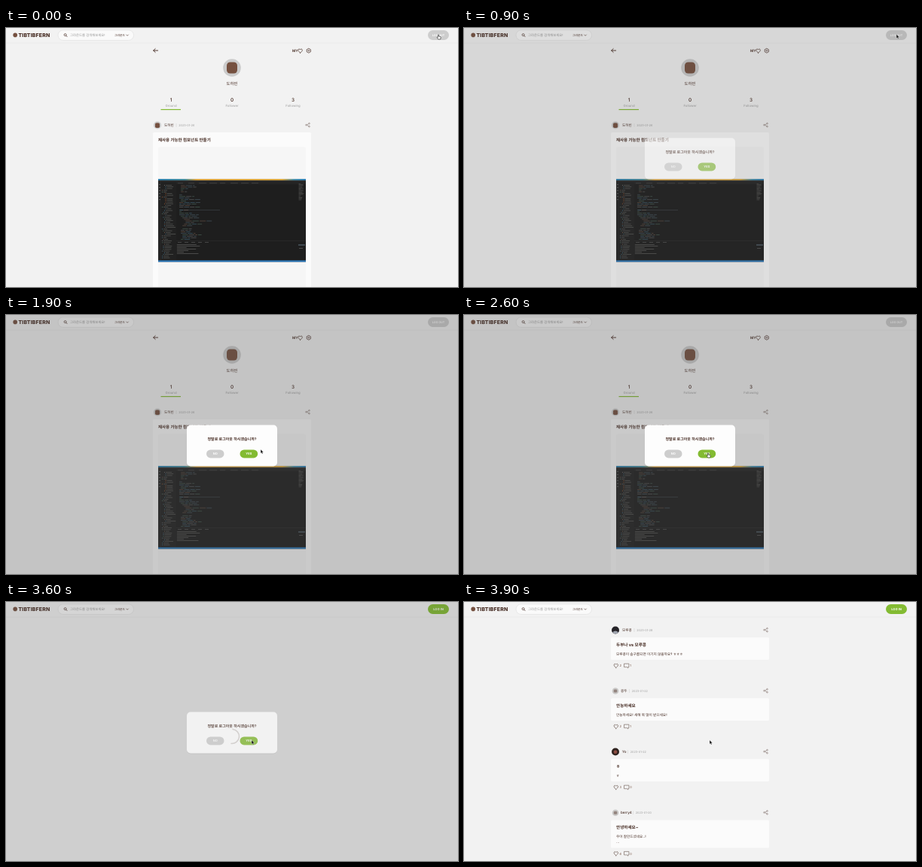
An HTML page that plays this animation: 600 px wide and 345 px high, repeating every 4400 ms.

```html
<!DOCTYPE html>
<html lang="ko">
<head>
<meta charset="utf-8">
<title>Log out</title>
<style>
  html, body { margin: 0; width: 100%; height: 100%; overflow: hidden; background: #f2f2f2; }
  svg { display: block; width: 600px; height: 345px; }
  text { font-family: Inter, "Noto Sans CJK KR", "Noto Sans CJK", "Noto Sans CJK JP", sans-serif; text-rendering: geometricPrecision; }
</style>
</head>
<body>
<svg id="stage" viewBox="0 0 600 345"></svg>
<script>
const LOOP = 4400;
const BG = '#f2f2f2', BROWN = '#43281f', SOFT = '#75503f', GRAY = '#9c9c9c', GREEN = '#83bb32';
const stage = document.getElementById('stage');

function add(parent, tag, attrs = {}) {
  const el = document.createElementNS('http://www.w3.org/2000/svg', tag);
  for (const key in attrs) el.setAttribute(key, attrs[key]);
  return parent.appendChild(el);
}
const group = parent => add(parent, 'g');
const rect = (g, x, y, width, height, fill, rx = 0, more = {}) =>
  add(g, 'rect', { x, y, width, height, fill, rx, ...more });
const circle = (g, cx, cy, r, fill, more = {}) => add(g, 'circle', { cx, cy, r, fill, ...more });
const line = (g, d, stroke, width = 0.7, more = {}) =>
  add(g, 'path', { d, stroke, 'stroke-width': width, fill: 'none', 'stroke-linecap': 'round', 'stroke-linejoin': 'round', ...more });

// y is the vertical middle of the capitals
function label(g, x, y, text, size, fill = BROWN, weight = 400, anchor = 'start', more = {}) {
  const el = add(g, 'text', { x, y: y + size * 0.36, 'font-size': size, fill, 'font-weight': weight, 'text-anchor': anchor, ...more });
  el.textContent = text;
  return el;
}

function pill(g, x, y, w, h, fill, text, size) {
  rect(g, x, y, w, h, fill, h / 2);
  label(g, x + w / 2, y + h / 2, text, size, '#fff', 700, 'middle');
}

function heart(g, x, y, color) {
  line(g, `M${x} ${y + 2.7}c-1.1-.9-2.7-2.1-2.7-3.6 0-1.7 2-2.1 2.7-.6 .7-1.5 2.7-1.1 2.7 .6 0 1.5-1.6 2.7-2.7 3.6z`, color);
}

function share(g, x, y) {
  line(g, `M${x + 1.5} ${y - 1.7}L${x - 1.5} ${y}L${x + 1.5} ${y + 1.7}`, '#80706a', 0.6);
  for (const [dx, dy] of [[2, -2], [-2, 0], [2, 2]])
    circle(g, x + dx, y + dy, 0.85, BG, { stroke: '#80706a', 'stroke-width': 0.6 });
}

function author(g, y, { name, nameX, dividerX, date, avatar }) {
  avatar(g, 201, y);
  label(g, nameX, y, name, 4.6, BROWN, 500);
  line(g, `M${dividerX} ${y - 2}v4`, '#cfcfcf', 0.5);
  label(g, dividerX + 3.3, y, date, 3.75, GRAY);
  share(g, 400.5, y - 0.3);
}

const plainAvatar = (g, x, y) => {
  circle(g, x, y, 5, '#cbcbcb');
  rect(g, x - 3, y - 3, 6, 6.5, SOFT, 1.8);
};
const smallAvatar = (g, x, y) => {
  circle(g, x, y, 4.3, '#c9c8c7');
  rect(g, x - 2.2, y - 2, 4.4, 4, '#93847e', 1.3);
};
const darkAvatar = (g, x, y) => {
  circle(g, x, y, 5, '#252328');
  add(g, 'path', { d: `M${x - 4} ${y + 3}q4-4 8 0q-4 4-8 0z`, fill: '#9fa4ae' });
};
const warmAvatar = (g, x, y) => {
  circle(g, x, y, 5, '#30231f');
  rect(g, x - 2.3, y - 2, 4.6, 4.6, '#8c4c42', 2);
};

function drawEditor(g) {
  let seed = 17;
  const random = () => (seed = (seed * 16807) % 2147483647) / 2147483647;
  const pick = list => list[Math.floor(random() * list.length)];
  const dash = (x, y, w, color, opacity = 0.45) => rect(g, x, y, w, 0.75, color, 0, { opacity });
  const colors = ['#5f9fc0', '#7295a8', '#a8846c', '#70a08a', '#99999b'];

  rect(g, 202, 201, 196, 110.5, '#1e1e1e');
  rect(g, 202, 201, 196, 2, 'url(#menubar)');
  rect(g, 202, 203, 196, 2.4, '#2b2b2b');
  rect(g, 202, 205.4, 4, 104, '#242424');
  rect(g, 206, 205.4, 20, 104, '#212121');
  rect(g, 226, 205.4, 172, 2.8, '#242424');
  rect(g, 202, 309.6, 196, 1.8, '#2f86d0');
  for (let i = 0; i < 6; i++) circle(g, 204, 208.5 + i * 4, 0.7, '#77797a');
  for (let x = 228; x < 335; x += 14) dash(x, 206.4, 7 + random() * 4, '#929292', 0.3);

  for (let y = 209; y < 307; y += 2.25) {
    const x = 207 + Math.floor(random() * 4) * 1.5;
    dash(x, y, 1, y > 220 && y < 234 ? '#e0793c' : pick(colors), 0.8);
    dash(x + 2, y, 4 + random() * 8, '#a0a39d', 0.42);
  }
  let indent = 1;
  for (let y = 209.5; y < 283; y += 2.05) {
    indent = Math.max(0, Math.min(4, indent + Math.floor(random() * 3) - 1));
    if (random() < 0.12) continue;
    let x = 230 + indent * 2.1;
    const words = 1 + Math.floor(random() * 4);
    for (let i = 0; i < words; i++) {
      const w = 2.5 + random() * 6;
      dash(x, y, w, pick(colors));
      x += w + 1;
    }
  }
  dash(231, 242, 53, '#8ba4af', 0.25);
  rect(g, 226, 283.5, 172, 0.4, '#353535');
  for (let x = 228; x < 268; x += 9) dash(x, 285, 5, '#bbb', 0.35);
  for (let y = 288; y < 301; y += 2) dash(226.8, y, 8 + random() * 24, '#b3b4b1', 0.4);
  for (let y = 207; y < 229; y += 1.2) dash(388.5, y, 2 + random() * 5, '#9b9b98', 0.3);
  rect(g, 388, 288, 9, 2, '#3f4950');
  dash(389, 293, 5, '#999', 0.5);
}

function drawProfile(g) {
  line(g, 'M201.6 30H195.7M198.2 27.6L195.7 30L198.2 32.4', BROWN, 0.9);
  label(g, 380, 30.4, 'MY', 4.7, BROWN, 600);
  heart(g, 390.6, 30.4, BROWN);
  add(g, 'path', { d: 'M401.8 27.2l2.6 1.5v3l-2.6 1.5-2.6-1.5v-3z', fill: 'none', stroke: BROWN, 'stroke-width': 0.7, 'stroke-linejoin': 'round' });
  circle(g, 401.8, 30.2, 1, 'none', { stroke: BROWN, 'stroke-width': 0.6 });

  circle(g, 300, 53, 11.8, '#cbcbcb');
  rect(g, 293, 45.5, 14, 15, SOFT, 4.5);
  label(g, 300, 74, '도하빈', 5.4, BROWN, 500, 'middle');
  [['1', 'Ground'], ['0', 'Follower'], ['3', 'Following']].forEach(([count, name], i) => {
    const x = 219 + i * 81;
    label(g, x, 96, count, 6.4, BROWN, 500, 'middle');
    label(g, x, 103, name, 4.3, GRAY, 400, 'middle');
  });
  rect(g, 205.5, 108, 26.5, 1.2, GREEN);

  author(g, 129.5, { name: '도하빈', nameX: 210, dividerX: 226, date: '2023-01-26', avatar: plainAvatar });
  rect(g, 195, 139, 210, 210, '#fbfbfb', 1.5);
  label(g, 202, 149.3, '재사용 가능한 컴포넌트 만들기', 5.5, BROWN, 700);
  rect(g, 202, 158.5, 196, 190, '#f6f6f6', 2);
  drawEditor(g);
}

const posts = [
  { y: 37.5, name: '모루콩', nameX: 210, dividerX: 226, date: '2023-01-28', avatar: darkAvatar,
    title: '두부나 vs 모루콩', body: ['모루콩이 솜구름되면 이기지 않을까요? ㅎㅎㅎ'], likes: 2, replies: 1 },
  { y: 118.5, name: '콩두', nameX: 208, dividerX: 219.5, date: '2023-01-22', avatar: smallAvatar,
    title: '안농하세요', body: ['안농하세요! 새해 복 많이 받으세요!'], likes: 2, replies: 1 },
  { y: 199.5, name: 'Yo', nameX: 210, dividerX: 217.5, date: '2023-01-22', avatar: warmAvatar,
    title: 'ㅎ', body: ['ㅎ'], likes: 3, replies: 0 },
  { y: 280.7, name: 'berry4', nameX: 208, dividerX: 224.5, date: '2023-01-20', avatar: smallAvatar,
    title: '안녕하세요~', body: ['우아 잘만드셨네요..!', '...'], likes: 6, replies: 0 },
];

function drawPost(g, post) {
  const { y } = post;
  const height = 22.5 + post.body.length * 7.2;
  author(g, y, post);
  rect(g, 195, y + 9.8, 210, height, '#fbfbfb', 1.5);
  label(g, 202, y + 19, post.title, 5.6, BROWN, 700);
  post.body.forEach((text, i) => label(g, 202, y + 31.5 + i * 7.5, text, 4.65, BROWN, 500));
  const foot = y + 47.5 + (post.body.length - 1) * 7;
  heart(g, 201.8, foot - 0.2, '#69564e');
  label(g, 206.6, foot, post.likes, 4, SOFT);
  const bubble = `M212.9 ${foot - 2.8}h6v4.5h-1.2v1.3l-1.5-1.3h-3.3z`;
  line(g, bubble, '#69564e', 0.6);
  label(g, 220.3, foot, post.replies, 4, SOFT);
}

function drawHeader(g) {
  rect(g, 0, 0, 600, 20, BG);
  rect(g, 0, 19.7, 600, 0.6, '#e4e4e4');
  circle(g, 12.2, 9.4, 2.8, SOFT);
  label(g, 16.4, 9.5, 'TIBTIBFERN', 6.9, BROWN, 800, 'start', { 'letter-spacing': 0.2 });
  rect(g, 69, 2.8, 100.5, 13.6, '#fafafa', 6.8, { stroke: '#dedede', 'stroke-width': 0.6 });
  circle(g, 78.6, 9.1, 1.5, 'none', { stroke: BROWN, 'stroke-width': 0.7 });
  line(g, 'M79.8 10.3L81 11.5', BROWN, 0.8);
  label(g, 85, 9.5, '그라운드를 검색해보세요!', 4.35, '#969696');
  label(g, 144, 9.5, '그라운드', 3.85, BROWN, 500);
  line(g, 'M159.8 9l1.3 1.3 1.3-1.3', BROWN, 0.6);
}

function drawModal(g) {
  rect(g, 240, 147.4, 120, 55, '#000', 5, { opacity: 0.06 });
  rect(g, 240, 146.5, 120, 55, '#fdfdfd', 5);
  label(g, 300, 164.9, '정말로 로그아웃 하시겠습니까?', 5, BROWN, 600, 'middle');
  pill(g, 266, 179.4, 23.5, 11, '#cdcdcd', 'NO', 4);
  pill(g, 310.5, 179.4, 23.7, 11, GREEN, 'YES', 4);
}

const gradient = add(add(stage, 'defs'), 'linearGradient', { id: 'menubar' });
[[0, '#2f80ad'], [0.18, '#468c9c'], [0.26, '#d9a23f'], [0.84, '#d8a640'], [0.92, '#4b8fa8'], [1, '#2f7fb5']]
  .forEach(([offset, color]) => add(gradient, 'stop', { offset, 'stop-color': color }));

rect(stage, 0, 0, 600, 345, BG);
const profile = group(stage), feed = group(stage);
drawProfile(profile);
posts.forEach(post => drawPost(feed, post));
drawHeader(group(stage));
const logOut = group(stage), logIn = group(stage);
pill(logOut, 560, 3, 28, 13, '#cdcdcd', 'LOG OUT', 3.7);
pill(logIn, 560, 3, 28, 13, GREEN, 'LOG IN', 4.1);
const spinner = line(stage, 'M300 169.5A9.5 9.5 0 0 1 300 188.5', '#4b3a32', 1.5);
const shade = rect(stage, 0, 0, 600, 345, '#4b4b4b');
const modal = group(stage);
drawModal(modal);

const arrow = group(stage), hand = group(stage);
add(arrow, 'path', { d: 'M0 0v5.2l1.2-1 .9 1.9 1-.5-.9-1.8h1.6z', fill: '#111', stroke: '#fff', 'stroke-width': 0.35 });
add(hand, 'path', { d: 'M-.6.2q.6-.7 1.2 0v2l2.2.5q.5.2.4 1l-.5 2.3h-2.9l-1.7-2.2q0-.8.7-.7l.6.4z', fill: '#fff', stroke: '#222', 'stroke-width': 0.6 });

// [time, value]: each value holds until the next time
const fade = [[0, 0], [600, 0.03], [700, 0.1], [800, 0.28], [900, 0.57], [1000, 0.96], [1100, 1],
  [3500, 0.95], [3600, 0.76], [3700, 0.36], [3800, 0.08], [3900, 0]];
const pointer = [[0, [574, 9, hand]], [700, [574, 8.5, arrow]], [1200, [562, 20, arrow]], [1300, [500, 98, arrow]],
  [1400, [416, 205, arrow]], [1500, [362, 244, arrow]], [1600, [345, 212, arrow]], [1700, [343, 182, arrow]],
  [1900, [338, 179, arrow]], [2000, [333, 181, hand]], [2100, [327, 183, hand]], [2200, [323, 184, hand]],
  [2600, [324, 184, hand]], [2700, [326, 184, hand]], [2800, [326.5, 184, hand]], [3500, [326, 184, arrow]]];
const page = [[0, 'profile'], [3500, 'loading'], [3900, 'feed']];
const at = (steps, time) => steps.findLast(([start]) => start <= time)[1];
const show = (el, on) => el.setAttribute('visibility', on ? 'visible' : 'hidden');

function render(now) {
  const time = now % LOOP;
  const current = at(page, time), opacity = at(fade, time), [x, y, shape] = at(pointer, time);
  show(profile, current === 'profile');
  show(logOut, current === 'profile');
  show(logIn, current !== 'profile');
  show(spinner, current === 'loading');
  show(feed, current === 'feed');
  const turn = (Math.floor(time / 100) * 100 - 3600) * 0.36;
  spinner.setAttribute('transform', `rotate(${turn + 6} 300 179)`);
  shade.setAttribute('opacity', opacity * 0.28);
  modal.setAttribute('opacity', opacity);
  for (const el of [arrow, hand]) {
    show(el, el === shape);
    el.setAttribute('transform', `translate(${x} ${y})`);
  }
}

const start = performance.now();
function tick() {
  render(performance.now() - start);
  requestAnimationFrame(tick);
}
tick();
</script>
</body>
</html>
```
